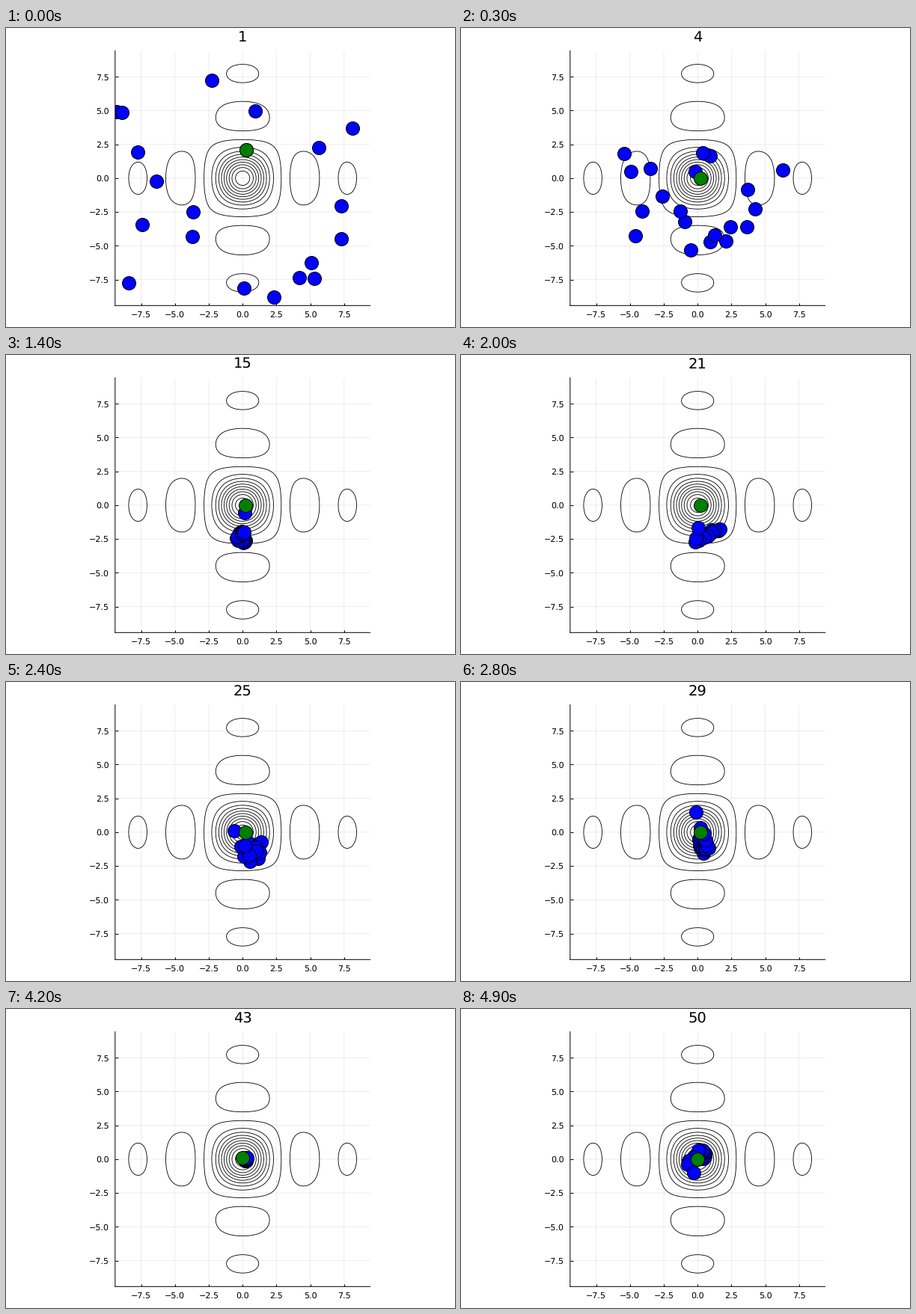
These frames come from a looping animation (600 by 400 pixels, 5 s). A matplotlib script:

```python
import numpy as np
import matplotlib.pyplot as plt
from matplotlib.animation import FuncAnimation

plt.rcParams.update({"font.family": "DejaVu Sans", "path.snap": False,
                     "text.hinting": "none"})

W, H, DPI = 600, 400, 100
FRAMES, INTERVAL = 50, 100
COUNT = 20
PX = 72 / DPI
LIMIT = 3 * np.pi
rng = np.random.default_rng(8)

# Where the particles start; the last one is the first best
START = np.array([
    (-8.92, 4.85), (-9.3, 4.92), (-2.27, 7.25), (0.95, 4.98), (8.14, 3.7),
    (5.63, 2.27), (-7.76, 1.92), (-6.37, -0.25), (-3.64, -2.52), (-7.45, -3.41),
    (-3.72, -4.3), (7.3, -2.07), (7.29, -4.5), (5.07, -6.27), (4.22, -7.38),
    (5.32, -7.42), (0.08, -8.14), (2.3, -8.78), (-8.42, -7.77), (0.27, 2.1)])


def trail(spread, *corners):
    """Particles along a path: loose at its head, crowded towards its end."""
    corners = np.array(corners)
    u = np.sqrt(np.linspace(0, 1, COUNT)) * (len(corners) - 1)
    path = np.column_stack([np.interp(u, range(len(corners)), c) for c in corners.T])
    noise = rng.normal(0, spread, path.shape)
    noise[0] = 0
    return path + noise


# The shape of the swarm at key steps
POSES = [
    (0, START),
    (7, trail(0.12, (-1.46, -4.65), (0.2, -4.6), (1.05, -3.2), (1.5, -2.2),
              (1.5, -1.0), (-0.9, -1.35), (0.15, -1.1))),
    (14, trail(0.08, (0.17, -0.55), (0.2, -2.0), (-0.4, -2.4), (0.1, -2.75),
               (-0.2, -1.9))),
    (20, trail(0.06, (0.03, -1.68), (-0.32, -2.75), (1.73, -1.7), (0.4, -2.2))),
    (28, trail(0.08, (-0.12, 1.5), (0.35, 0.2), (0.75, -1.1), (0.4, -1.4),
               (0.2, -0.5))),
    (42, trail(0.03, (0.32, 0.1), (0.2, -0.12))),
    (49, trail(0.08, (-0.28, -1.02), (-0.85, -0.3), (0.15, 0.7), (0.6, 0.35),
               (0.0, 0.1))),
]
SWAY = rng.normal(0, 0.7, (len(POSES), COUNT, 2))

# Best position so far, from the given step on
BEST = [(0, START[-1]), (3, (0.2, 0.0)), (34, (0.0, 0.1)), (45, (0.0, 0.0))]


def particles(step):
    i = max(k for k in range(len(POSES) - 1) if POSES[k][0] <= step)
    (start, a), (end, b) = POSES[i:i + 2]
    u = (step - start) / (end - start)
    calming = np.exp(-start / 30)
    return a + (b - a) * u + SWAY[i] * calming * np.sin(np.pi * u)


def best(step):
    return [pos for start, pos in BEST if start <= step][-1]


fig = plt.figure(figsize=(W / DPI, H / DPI), dpi=DPI, facecolor="white")
cx, cy, half = 316.2, 199.1, 170.4
ax = fig.add_axes([(cx - half) / W, (cy - half) / H, 2 * half / W, 2 * half / H])
ax.set(xlim=(-LIMIT, LIMIT), ylim=(-LIMIT, LIMIT))
ticks = np.arange(-7.5, 8, 2.5)
ax.set_xticks(ticks)
ax.set_yticks(ticks)
ax.tick_params(direction="in", length=3.5 * PX, width=PX, labelsize=8)
ax.tick_params(axis="x", pad=7 * PX)
ax.tick_params(axis="y", pad=8 * PX)
ax.spines[["top", "right"]].set_visible(False)
ax.spines[["left", "bottom"]].set_linewidth(PX)
ax.grid(color="black", alpha=0.1, linewidth=0.7 * PX)
ax.set_axisbelow(True)

axis = np.linspace(-LIMIT, LIMIT, 400)
wave = np.sinc(axis / np.pi) ** 2
ax.contour(axis, axis, np.outer(wave, wave), levels=np.arange(0.01, 1, 0.1),
           colors="black", linewidths=0.85 * PX)

style = dict(marker="o", linestyle="", markersize=18 * PX,
             markeredgecolor="black", markeredgewidth=PX)
blue, = ax.plot([], [], color="blue", zorder=4, **style)
green, = ax.plot([], [], color="green", zorder=5, **style)
title = fig.text(cx / W, 1 - 18 / H, "", fontsize=14, ha="center", va="baseline")


def draw(step):
    blue.set_data(*particles(step)[::-1].T)
    x, y = best(step)
    green.set_data([x], [y])
    title.set_text(str(step + 1))
    return blue, green, title


anim = FuncAnimation(fig, draw, frames=FRAMES, interval=INTERVAL,
                     repeat=True, repeat_delay=0)
plt.show()
```
